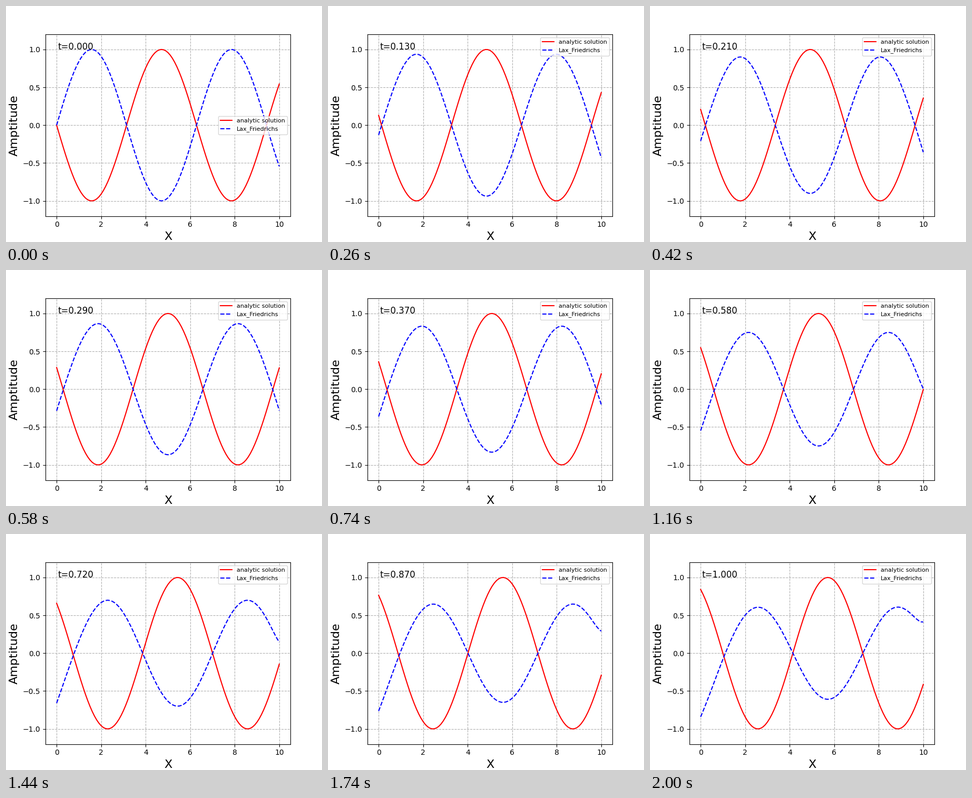
Recreate the animation shown at these times as a matplotlib script. Size 600x450 px, loop 2020 ms.

```python
import numpy as np
import matplotlib.pyplot as plt
from matplotlib.animation import FuncAnimation

plt.rcParams["font.family"] = "DejaVu Sans"

STEPS = 101
DX, DT, SPEED = 0.1, 0.01, 1.0
x = np.linspace(0, 10, 101)


def analytic(t):
    return -np.sin(x - SPEED * t)


def lax_friedrichs():
    """Advect sin(x) with exact values on both boundaries."""
    c = SPEED * DT / DX
    u = np.zeros((STEPS, x.size))
    u[0] = np.sin(x)
    for n in range(1, STEPS):
        left, right = u[n - 1, :-2], u[n - 1, 2:]
        u[n, 1:-1] = 0.5 * (right + left) - 0.5 * c * (right - left)
        u[n, [0, -1]] = np.sin(x[[0, -1]] - SPEED * n * DT)
    return u


waves = lax_friedrichs()

fig, ax = plt.subplots(figsize=(6, 4.5), dpi=100)
exact, = ax.plot(x, analytic(0), "r-", lw=1.5, label="analytic solution")
approx, = ax.plot(x, waves[0], "b--", lw=1.5, label="Lax_Friedrichs")
clock = ax.text(0.05, 1.0, "t=0.000", fontsize=12)

ax.set_xlim(-0.5, 10.5)
ax.set_ylim(-1.2, 1.2)
ax.set_xticks(range(0, 11, 2))
ax.set_yticks([-1.0, -0.5, 0.0, 0.5, 1.0])
ax.set_xlabel("X", fontsize=16)
ax.set_ylabel("Amptitude", fontsize=16)
ax.grid(linestyle="--")
ax.legend(loc="best", fontsize=8)  # re-placed on every draw


def update(n):
    t = n * DT
    exact.set_ydata(analytic(t))
    approx.set_ydata(waves[n])
    clock.set_text(f"t={t:.3f}")
    return exact, approx, clock


anim = FuncAnimation(fig, update, frames=STEPS, interval=20,
                     init_func=lambda: update(0), repeat=True, repeat_delay=0)
plt.show()
```
